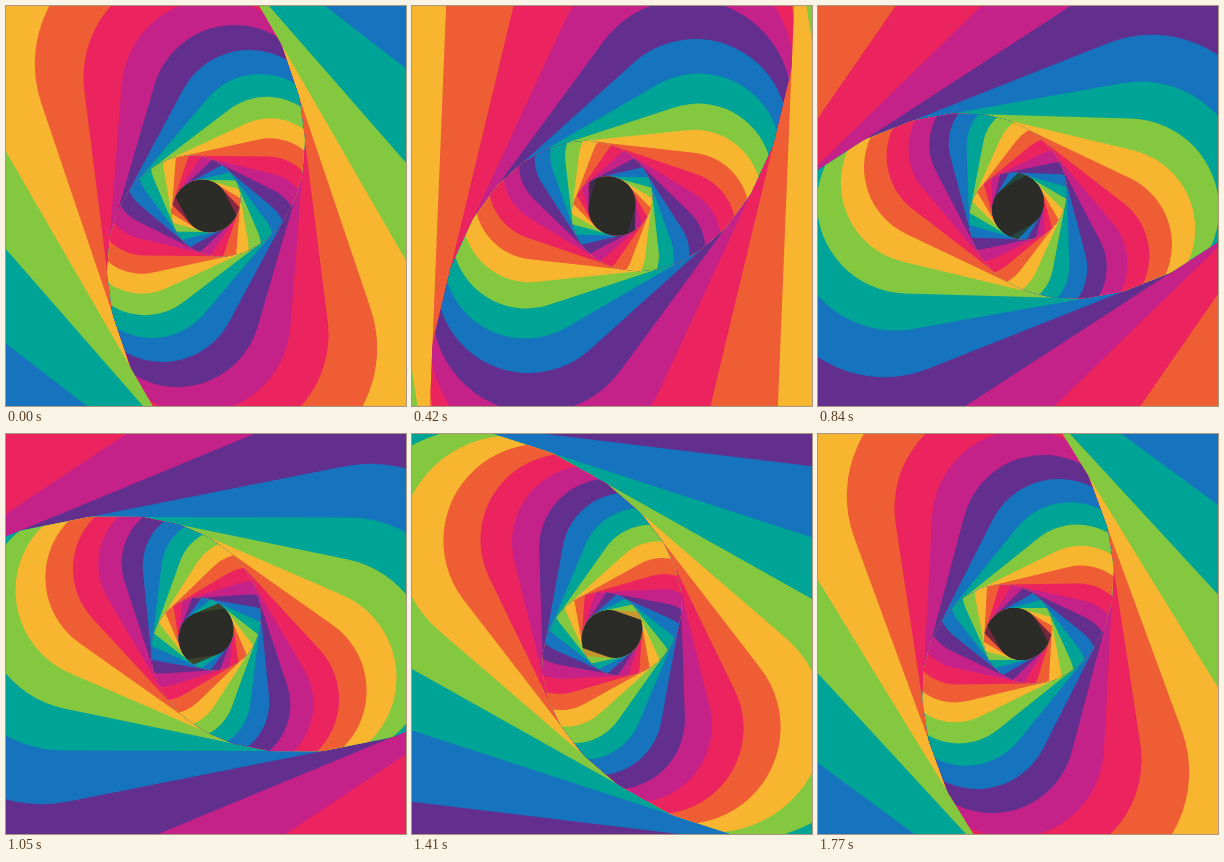
Animation, 400 px wide and 400 px high, one loop 1800 ms. Source, as an HTML page with a canvas:

```html
<!DOCTYPE html>
<html lang="en">
<head>
<meta charset="utf-8">
<title>Rainbow tunnel</title>
<style>
  html, body { margin: 0; width: 100%; height: 100%; overflow: hidden; background: #2b2b27; }
  canvas { display: block; width: 400px; height: 400px; }
</style>
</head>
<body>
<canvas id="stage" width="400" height="400"></canvas>
<script>
const ctx = document.getElementById('stage').getContext('2d');

const SIZE = 400, LOOP = 1800, TICK = 30;
const DARK = [43, 43, 39];
// From the outside inwards
const COLORS = [
  [248, 182, 48], [238, 93, 51], [235, 35, 95], [196, 34, 137],
  [98, 47, 142], [22, 115, 189], [0, 164, 150], [132, 200, 63]
];
const COUNT = COLORS.length;
const NEAR = 5, FAR = -26.5;
const STRETCH = 1.22;
const RAD = Math.PI / 180;

// Perspective: the radius grows as a layer comes closer
const radius = u => 1 / (0.00685 - 0.00127 * u + 4e-6 * u * u);

// Each layer starts an eighth of a half turn after the last and spins faster as it nears
const angle = (j, u) => (30 - 22.5 * j - 11.25 * u - 0.08 * u * u) * RAD;

function shade(index, u) {
  const color = COLORS[((index % COUNT) + COUNT) % COUNT];
  const a = Math.max(0, Math.min(1, u - FAR));
  return `rgb(${color.map((v, i) => Math.round(DARK[i] + (v - DARK[i]) * a)).join(',')})`;
}

// A pill lying along the direction measured from the vertical
function pill(r, turn) {
  const c = r * STRETCH;
  const x = Math.sin(turn) * c, y = Math.cos(turn) * c;
  ctx.beginPath();
  ctx.arc(x, y, r, -turn, Math.PI - turn);
  ctx.arc(-x, -y, r, Math.PI - turn, 2 * Math.PI - turn);
  ctx.closePath();
}

function draw(time) {
  const step = time / LOOP * COUNT;
  ctx.save();
  ctx.translate(SIZE / 2, SIZE / 2);
  // Every layer is cut by all the layers around it
  for (let j = Math.floor(step - NEAR) + 1; ; j++) {
    const u = step - j;
    pill(radius(u), angle(j, u));
    ctx.clip();
    ctx.fillStyle = shade(j, u);
    ctx.fillRect(-SIZE / 2, -SIZE / 2, SIZE, SIZE);
    if (u <= FAR) break;
  }
  ctx.restore();
}

const begin = performance.now();
function frame() {
  const time = (performance.now() - begin) % LOOP;
  draw(Math.floor(time / TICK) * TICK);
  requestAnimationFrame(frame);
}
frame();
</script>
</body>
</html>
```
